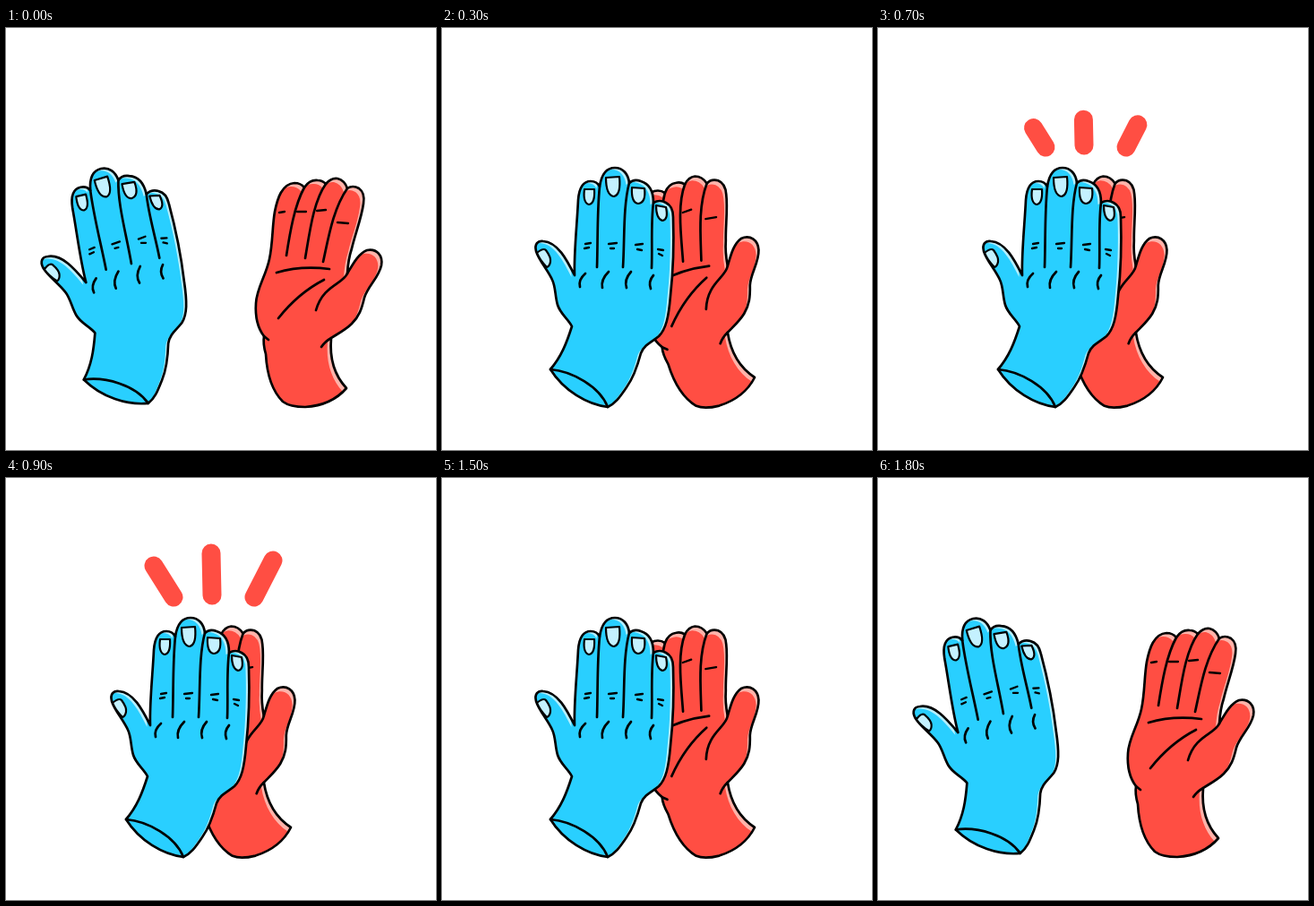
An HTML page that plays this animation: 480x471 px, repeating every 1.9 s.

```html
<!DOCTYPE html>
<html lang="en">
<head>
<meta charset="utf-8">
<title>High five</title>
<style>
  html, body { margin: 0; width: 100%; height: 100%; overflow: hidden; background: #fff; }
  svg { display: block; width: 100vw; height: 100vh; }
  .ink { fill: none; stroke: #000; stroke-width: 2.7; stroke-linecap: round; stroke-linejoin: round; }
  .nail { fill: #c4f1ff; stroke-width: 2.2; }
  .fine { stroke-width: 2.3; }
  #sparks line { stroke: #ff4e43; stroke-width: 21; stroke-linecap: round; }
</style>
</head>
<body>
<svg viewBox="0 0 480 471">
  <defs>
    <path id="redBody" d="M309 417C296 404 291 382 290 364C288 357 287 350 288 344C281 335 278 322 279 307C280 290 290 277 294 258C298 240 297 222 300 205C303 190 308 174 322 173Q329 173 333 178Q339 169 348 170Q353 170 357 174Q363 167 370 168Q378 170 381 179Q387 175 394 179Q401 184 399 196C397 212 389 232 386 246Q382 258 381 274C387 264 393 252 403 248C414 246 421 254 419 265C416 279 404 288 400 301C397 314 394 322 386 330C379 337 369 342 363 346C361 368 367 388 380 402C367 417 350 422 334 423Q317 423 309 417Z"/>
    <path id="blueBody" d="M148 276C147 252 151 216 152 192C153 178 158 171 166 171Q173 171 176 177C178 163 184 156 193 156C202 156 208 163 209 173Q214 168 222 171C232 174 236 183 236 195Q243 191 250 195Q258 199 258 211C259 240 258 272 255 299C253 323 250 336 242 344C235 350 226 353 222 363C218 378 214 390 206 401C199 411 194 419 185 423C162 420 136 405 121 381C133 367 139 352 145 333C141 325 132 319 129 309C126 299 127 289 123 281C118 270 108 259 105 249C103 241 107 237 113 238C129 239 139 258 148 276Z"/>
    <clipPath id="redClip"><use href="#redBody"/></clipPath>
    <clipPath id="blueClip"><use href="#blueBody"/></clipPath>
  </defs>

  <g id="red">
    <g clip-path="url(#redClip)">
      <use href="#redBody" fill="#ffb3aa"/>
      <use href="#redBody" fill="#ff4e43" x="-4" y="4"/>
    </g>
    <use href="#redBody" class="ink"/>
    <path class="ink" d="M333 178C322 198 317 228 313 254M357 174C343 194 339 228 334 257M381 179C365 202 360 234 354 261M381 274C376 286 354 287 346 315M363 346Q356 350 352 356M288 344L293 348M302 273Q329 265 361 269M304 324Q326 296 355 281"/>
    <path class="ink fine" d="M305 206L311 205M325 205L335 205M347 204L357 203M370 217L382 218"/>
  </g>

  <g id="blue">
    <g clip-path="url(#blueClip)">
      <use href="#blueBody" fill="#b5efff"/>
      <use href="#blueBody" fill="#29cfff" x="-3.5" y="2"/>
    </g>
    <use href="#blueBody" class="ink"/>
    <path class="ink" d="M176 177C173 206 174 240 173 267M209 173C202 199 204 236 202 267M236 195C233 218 235 244 234 268M121 381C145 383 176 400 185 423M160 274Q152 281 154 289M186 272Q177 281 179 290M211 272Q203 281 206 290M236 276Q230 283 233 291"/>
    <path class="ink fine" d="M160 241L166 240M159 246L164 245M186 241L195 240M188 246L192 246M216 242L224 241M218 247L223 248M241 247L247 248M242 252L246 254"/>
    <path class="ink nail" d="M159 180H170Q171 196 164 197Q157 195 159 180ZM183 167L198 166Q200 186 192 188Q183 187 183 167ZM212 178L226 179Q228 195 219 196Q211 195 212 178ZM239 198L250 200Q253 214 246 215Q239 213 239 198ZM106 251Q113 245 116 248Q122 256 121 261Q120 266 117 267Q109 259 106 251Z"/>
  </g>

  <g id="sparks"><line/><line/><line/></g>
</svg>
<script>
const LOOP = 1900, STEP = 100;
const byId = id => document.getElementById(id);

// Piecewise linear track: [time, value] pairs
function track(t, keys) {
  const i = keys.findIndex(k => k[0] > t);
  if (i < 0) return keys[keys.length - 1][1];
  if (!i) return keys[0][1];
  const [t0, a] = keys[i - 1], [t1, b] = keys[i];
  return a + (b - a) * (t - t0) / (t1 - t0);
}

const closing = [[0, 0], [100, .3], [200, .7], [300, 1], [1500, 1], [1600, .7], [1700, .3], [1800, 0]];
const blueSlide = [[300, 0], [400, 8], [500, 13], [1100, 13], [1200, 9], [1300, 9], [1500, 0]];
const redSlide = [[300, 0], [400, -18], [500, -31], [1300, -31], [1400, -18], [1500, 0]];
// Spark ends: 0 = base, 1 = full bar, 2 = end of travel
const sparkTip = [[600, .42], [900, 1], [1100, 2]];
const sparkTail = [[900, 0], [1000, .75], [1100, 1.7]];

// Base x, y, then offset to the full bar, then further travel relative to it
const bars = [[187, 133, -22, -35, .75], [230, 131, -1, -47, 1.04], [277, 133, 21, -41, .62]];

function place(id, x, y, angle, px, py) {
  byId(id).setAttribute('transform', `translate(${x} ${y}) rotate(${angle} ${px} ${py})`);
}

function draw(t) {
  const c = track(t, closing);
  place('blue', -87 * (1 - c) + track(t, blueSlide), 1 - c, -13.1 * (1 - c), 193, 156);
  place('red', -31 * c + track(t, redSlide), -12 * c, -14.1 * c, 380, 402);

  byId('sparks').style.display = t >= 600 && t < 1200 ? '' : 'none';
  bars.forEach(([x, y, dx, dy, far], i) => {
    const line = byId('sparks').children[i];
    [sparkTail, sparkTip].forEach((keys, n) => {
      const v = track(t, keys);
      const s = Math.min(v, 1) + Math.max(v - 1, 0) * far;
      line.setAttribute('x' + (n + 1), x + dx * s);
      line.setAttribute('y' + (n + 1), y + dy * s);
    });
  });
}

function tick() {
  draw(Math.floor(performance.now() % LOOP / STEP) * STEP);
  requestAnimationFrame(tick);
}
tick();
</script>
</body>
</html>
```
